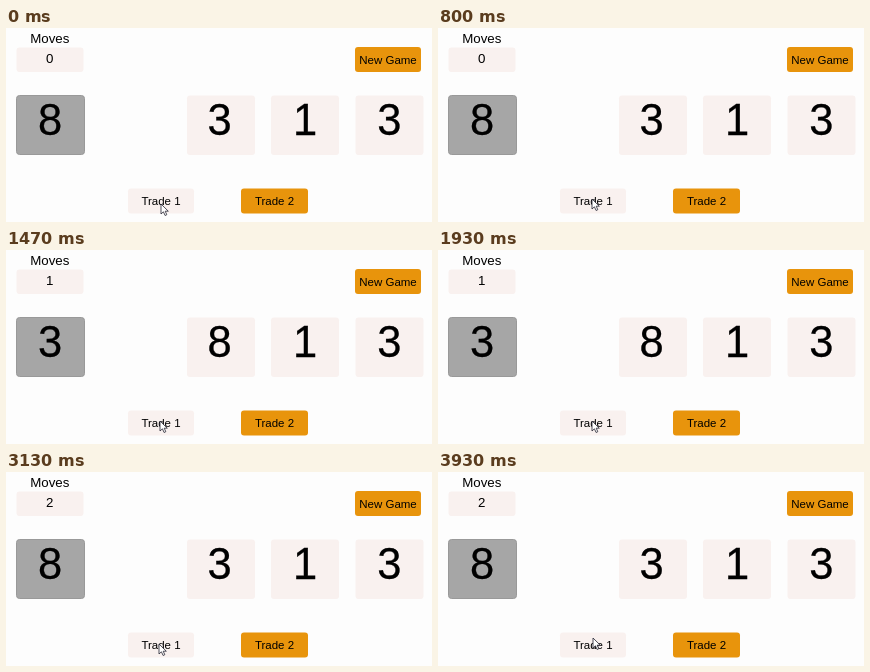
Write an HTML page that moves like this. It is 426 by 194 pixels and loops after 3.99 s.

```html
<!DOCTYPE html>
<html lang="en">
<head>
<meta charset="utf-8">
<title>Trade game</title>
<style>
  html, body { margin: 0; width: 100%; height: 100%; overflow: hidden; background: #fdfdfd; }
  svg { display: block; width: 100%; height: 100%; }
  text { font-family: "Liberation Sans", Arial, sans-serif; fill: #000; text-anchor: middle; }
  .label { font-size: 13.3px; }
  .button { font-size: 11.5px; }
  .digit { font-size: 43.5px; stroke: #000; stroke-width: 0.3px; }
</style>
</head>
<body>
<svg id="stage" viewBox="0 0 426 194"></svg>
<script>
const LOOP = 3990;
const PALE = '#f9f1ef', ORANGE = '#e8940c';
const TRADES = [1135, 2200];
const CURSOR = [
  [0, 155, 176], [530, 154, 171], [2670, 154, 171],
  [3130, 153, 172], [3800, 155, 166], [LOOP, 155, 166]
];
const stage = document.getElementById('stage');

function add(tag, attrs, content = '') {
  const node = document.createElementNS('http://www.w3.org/2000/svg', tag);
  for (const [name, value] of Object.entries(attrs)) node.setAttribute(name, value);
  node.textContent = content;
  return stage.appendChild(node);
}

function box(x, y, width, height, fill, stroke = 'none') {
  add('rect', { x, y, width, height, rx: 3, fill, stroke });
}

function label(x, y, kind, content) {
  return add('text', { x, y, class: kind }, content);
}

function button(x, y, width, fill, caption) {
  box(x, y, width, 25, fill);
  label(x + width / 2, y + 16.5, 'button', caption);
}

label(43.8, 15, 'label', 'Moves');
box(10.5, 19.5, 67, 24.5, PALE);
const moves = label(43.8, 35, 'label', '0');
button(349, 19, 66, ORANGE, 'New Game');

box(10.5, 67.5, 68, 59, '#a6a6a6', '#999');
for (const x of [181, 265, 349.5]) box(x, 67.5, 68, 59.5, PALE);
const held = label(44, 107, 'digit', '8');
const first = label(213.5, 107, 'digit', '3');
label(299, 107, 'digit', '1');
label(383.3, 107, 'digit', '3');

button(122, 160.5, 66, PALE, 'Trade 1');
button(235, 160.5, 67, ORANGE, 'Trade 2');
const cursor = add('path', {
  d: 'M0 0V10L2.4 7.8L4.1 11.5L5.8 10.7L4.2 7.2H7.3Z',
  fill: '#fff', stroke: '#222230', 'stroke-width': 0.8
});

function cursorAt(time) {
  const next = CURSOR.findIndex(point => point[0] > time);
  const [t0, x0, y0] = CURSOR[next - 1];
  const [t1, x1, y1] = CURSOR[next];
  const part = (time - t0) / (t1 - t0);
  return [x0 + (x1 - x0) * part, y0 + (y1 - y0) * part];
}

function render(time) {
  const count = TRADES.filter(at => time >= at).length;
  moves.textContent = count;
  held.textContent = count % 2 ? 3 : 8;
  first.textContent = count % 2 ? 8 : 3;
  const [x, y] = cursorAt(time);
  cursor.setAttribute('transform', `translate(${x} ${y})`);
}

const start = performance.now();
function tick() {
  render((performance.now() - start) % LOOP);
  requestAnimationFrame(tick);
}
tick();
</script>
</body>
</html>
```
